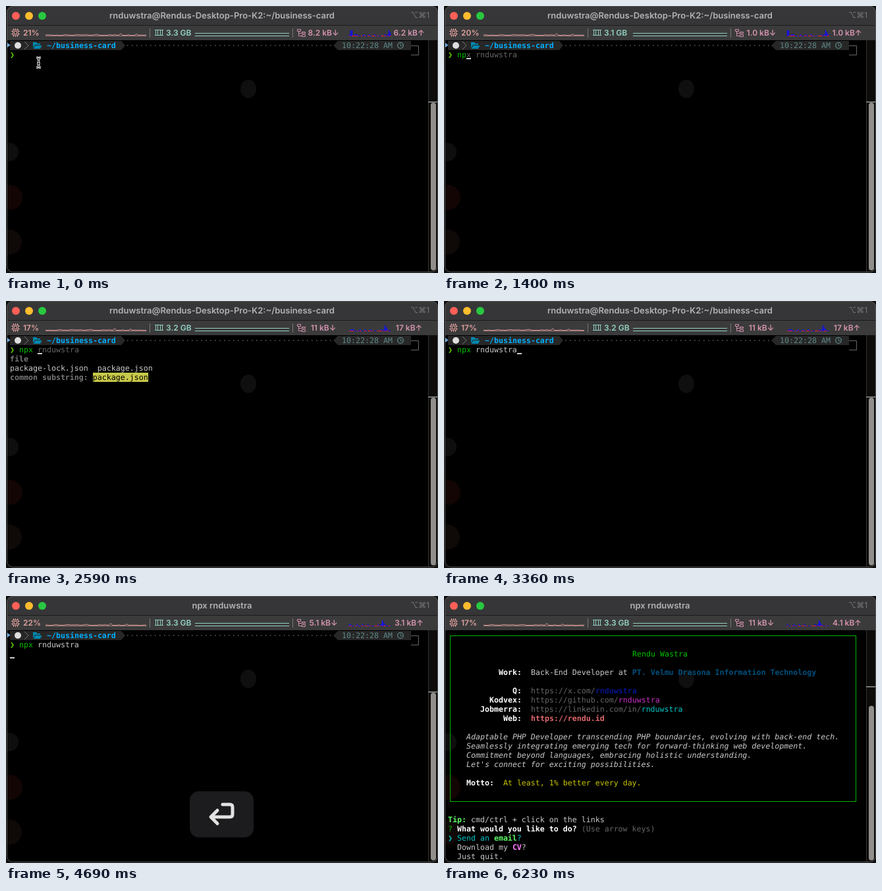
An HTML page that plays this animation: 656x406 px, repeating every 6300 ms.

```html
<!DOCTYPE html>
<html lang="en">
<head>
<meta charset="utf-8">
<title>Terminal business card</title>
<style>
html, body { margin: 0; width: 100%; height: 100%; overflow: hidden; background: #000; }
svg { display: block; width: 656px; height: 406px; }
text { white-space: pre; text-rendering: geometricPrecision; }
.term text { font: 11.627px "DejaVu Sans Mono", monospace; fill: #c9c9c9; }
.ui text { font: 600 12px Inter, sans-serif; }
.ui .title { font-size: 13px; fill: #b3b3b4; text-anchor: middle; }
.term .b { font-weight: bold; }
.term .i { font-style: italic; }
.term .white { fill: #fff; }
.term .dim { fill: #666; }
.term .head { fill: #777; }
.term .green { fill: #00c200; }
.term .lime { fill: #5ffa68; }
.term .cyan { fill: #00c5c7; }
.term .yellow { fill: #c7c400; }
.term .blue { fill: #0a1cc4; }
.term .navy { fill: #004f7c; }
.term .pink { fill: #ca30c7; }
.term .violet { fill: #ff77ff; }
.term .red { fill: #e0686c; }
.term .path { fill: #00afff; }
.term .time { fill: #5f8787; }
.term .prompt { fill: #5fd700; }
.term .black { fill: #000; }
</style>
</head>
<body>
<svg viewBox="0 0 656 406" fill="none">
  <defs><clipPath id="win"><rect x="1" y="0" width="655" height="405" rx="9"/></clipPath></defs>
  <rect width="656" height="406" fill="#101010"/>
  <g clip-path="url(#win)">
    <rect width="656" height="406" fill="#000"/>
    <ellipse cx="368" cy="126" rx="12" ry="14" fill="#0f0f0f"/>
    <circle cx="5" cy="222" r="14" fill="#0e0e0e"/>
    <circle cx="6" cy="291" r="19" fill="#120504"/>
    <circle cx="5" cy="359" r="19" fill="#0f0908"/>
    <rect width="656" height="29" fill="#363638"/>
    <rect y="30" width="656" height="22" fill="#3b3b3c"/>
    <path d="M0 29.5H656" stroke="#1c1c1c"/>
    <path d="M641.5 52V406" stroke="#333"/>
    <rect x="642" y="52" width="14" height="354" fill="#0d0c0b"/>
    <path id="mark" d="M641 0H656" stroke="#777" stroke-width="2"/>
    <rect id="thumb" x="645" width="8" rx="4" fill="#918f8c"/>
  </g>
  <rect x="1.5" y=".5" width="654" height="404" rx="9" stroke="#555"/>
  <g class="ui">
    <circle cx="15" cy="15" r="6" fill="#ff5f57"/>
    <circle cx="35" cy="15" r="6" fill="#febc2e"/>
    <circle cx="55" cy="15" r="6" fill="#28c840"/>
    <text id="title" class="title" x="328" y="19"></text>
    <text x="614" y="18" fill="#77777a" style="font:12px Inter,'DejaVu Sans',sans-serif">⌥⌘1</text>
    <path d="M218.5 34V48M435.5 34V48" stroke="#777"/>
    <g stroke="#d89a97">
      <rect x="10.5" y="36.500" width="8" height="8"/>
      <rect x="12.500" y="38.500" width="4" height="4"/>
      <path d="M11.500 34V36M14.500 34V36M17.500 34V36M11.500 45V47M14.500 45V47M17.500 45V47M8 38.500H10M8 42.500H10M19 38.500H21M19 42.500H21"/>
      <path d="M60 45.500H213" opacity=".7"/>
      <path id="cpuLine"/>
    </g>
    <g stroke="#8fcdbd">
      <path d="M226 36.500H239M226 44.500H239M227.500 36V45M230.500 36V45M234.500 36V45M237.500 36V45M287 41.500H430M287 45.500H430"/>
    </g>
    <path d="M442.500 35.500H447.500V38.500H442.500ZM449.500 43.500H454.500V46.500H449.500ZM444.500 39V45.500H449M445 41.500H449M449.500 39.500H454.500V41.500H449.500Z" stroke="#cf8fa9"/>
    <path id="netLine" stroke="#0c0cff" stroke-width="1.500"/>
    <path id="netDots" stroke="#e02030"/>
    <text id="cpu" x="26" y="45" fill="#e0a19e"></text>
    <text id="mem" x="243" y="45" fill="#93d2c2"></text>
    <g fill="#d594ae" text-anchor="middle">
      <text id="down" x="482" y="45"></text>
      <text id="up" x="612" y="45"></text>
    </g>
  </g>
  <g id="shell" class="term">
    <path d="M6 53H175L181 60L175 67H6Z M615 53H504L497 60L504 67H615Z" fill="#272727"/>
    <path d="M2 56L6.500 59.500L2 63Z" fill="#6fa8dc"/>
    <circle cx="18" cy="60" r="5" fill="#dedede"/>
    <path d="M28 54L34 60L28 66" stroke="#777"/>
    <path d="M41 55H46L47.500 57H52V59H44L41 64ZM44.500 60H54.500L52 65H41.500Z" fill="#0087af"/>
    <path d="M184 60H496" stroke="#626262" stroke-width="1.500" stroke-dasharray="1.500 5.500"/>
    <circle cx="599" cy="60" r="4.300" stroke="#5f8787" stroke-width="1.300"/>
    <path d="M599 57.500V60.500H601.500" stroke="#5f8787"/>
    <path d="M615 60.500H626.500V74.500H615" stroke="#666"/>
    <g id="promptText"></g>
    <g id="input"></g>
    <rect id="cursor" width="7" height="2" fill="#d0d0d0"/>
  </g>
  <g id="card" class="term">
    <rect x="9.500" y="60.500" width="616" height="252" stroke="#00b400"/>
    <g id="cardText"></g>
  </g>
  <g id="key">
    <rect x="279" y="297" width="97" height="70" rx="14" fill="#202022"/>
    <path d="M329 317H340Q344 317 344 321V332Q344 336 340 336H312M321 326L311 336L321 346" stroke="#fff" stroke-width="5" stroke-linejoin="round" stroke-linecap="round"/>
  </g>
  <g id="mouse">
    <path id="beam" d="M-3.500 -7.500Q0 -7.500 0 -5V5Q0 7.500 -3.500 7.500M3.500 -7.500Q0 -7.500 0 -5V5Q0 7.500 3.500 7.500M-2 1.500H2" stroke="#fff" stroke-width="3"/>
    <use href="#beam" style="stroke:#000"/>
    <path d="M-3.500 -7.500Q0 -7.500 0 -5V5Q0 7.500 -3.500 7.500M3.500 -7.500Q0 -7.500 0 -5V5Q0 7.500 3.500 7.500M-2 1.500H2" stroke="#000"/>
  </g>
</svg>
<script>
const LOOP = 6300, STEP = 70;
const USER = 'rnduwstra';
const COMMAND = 'npx ' + USER;
const $ = id => document.getElementById(id);
const show = (id, on) => $(id).setAttribute('visibility', on ? 'visible' : 'hidden');
const set = (id, attrs) => { for (const k in attrs) $(id).setAttribute(k, attrs[k]); };

// One terminal line: column, row, then pairs of class and text.
function line(col, row, ...parts) {
  let spans = '';
  for (let i = 0; i < parts.length; i += 2)
    spans += `<tspan class="${parts[i]}">${parts[i + 1]}</tspan>`;
  return `<text x="${6 + 7 * col}" y="${64 + 14 * row}">${spans}</text>`;
}

$('promptText').innerHTML =
  line(8, 0, 'path b', '~/business-card') +
  line(72, 0, 'time', '10:22:28 AM') +
  line(0, 1, 'prompt b', '❯');

$('cardText').innerHTML = [
  line(40, 2, 'green', 'Rendu Wastra'),
  line(11, 4, 'white b', 'Work:', '', '  Back-End Developer at ', 'navy b', 'PT. Velmu Drasona Information Technology'),
  line(14, 6, 'white b', 'Q:', 'dim', '  https://x.com/', 'blue', USER),
  line(9, 7, 'white b', 'Kodvex:', 'dim', '  https://github.com/', 'pink', USER),
  line(7, 8, 'white b', 'Jobmerra:', 'dim', '  https://linkedin.com/in/', 'cyan', USER),
  line(12, 9, 'white b', 'Web:', 'red b', '  https://rendu.id'),
  ...['Adaptable PHP Developer transcending PHP boundaries, evolving with back-end tech.',
    'Seamlessly integrating emerging tech for forward-thinking web development.',
    'Commitment beyond languages, embracing holistic understanding.',
    "Let's connect for exciting possibilities."].map((s, i) => line(4, 11 + i, 'i', s)),
  line(4, 16, 'white b', 'Motto:', 'yellow', '  At least, 1% better every day.'),
  line(0, 20, 'lime b', 'Tip:', '', ' cmd/ctrl + click on the links'),
  line(0, 21, 'green', '? ', 'white b', 'What would you like to do?', 'dim', ' (Use arrow keys)'),
  line(0, 22, 'cyan', '❯ Send an ', 'lime b', 'email', 'cyan', '?'),
  line(2, 23, '', 'Download my ', 'violet b', 'CV', '', '?'),
  line(2, 24, '', 'Just quit.')
].join('');

// Status bar readings, refreshed once a second.
const cpu = [21, 20, 14, 17, 19, 22, 17];
const mem = ['3.3', '3.1', '3.1', '3.2', '3.3', '3.3', '3.3'];
const down = ['8.2', '1.0', '5.1', '11', '0.0', '5.1', '11'];
const up = ['6.2', '1.0', '0.0', '17', '0.0', '3.1', '4.1'];
const keyTimes = [1120, 1400, 1680, 2170];
const ACCEPT = 3150, ENTER = 3920, CARD = 4760;

const noise = n => { const s = Math.sin(n * 12.9898) * 43758.5453; return s - Math.floor(s); };

function drawStatus(k) {
  $('cpu').textContent = cpu[k] + '%';
  $('mem').textContent = mem[k] + ' GB';
  $('down').textContent = down[k] + ' kB↓';
  $('up').textContent = up[k] + ' kB↑';
  let load = '', bars = '', dots = '';
  for (let x = 60; x <= 213; x += 3) {
    const n = x / 3 + k, peak = n === 58 ? 2.5 : n === 46 || n === 66 ? 1.3 : 0;
    load += (load ? 'L' : 'M') + x + ' ' + (44.7 - noise(n) * 1.2 - peak).toFixed(1);
  }
  for (let x = 521; x < 584; x += 2) {
    const n = (x - 521) / 2 + k, r = noise(n + 90);
    const h = n === 1 || n === 2 || n === 30 ? 9 : n === 31 ? 6 : r > .75 ? 3 : 1;
    bars += `M${x + .5} 46V${46 - h}`;
    if (r > .45) dots += `M${x} 45.500h2`;
  }
  set('cpuLine', { d: load });
  set('netLine', { d: bars });
  set('netDots', { d: dots });
}

function inputLines(t, typed) {
  if (t >= ACCEPT) return line(2, 1, 'green', 'npx', '', ' ' + USER);
  if (!typed) return '';
  let out = line(2, 1, 'green', COMMAND.slice(0, typed), 'dim', COMMAND.slice(typed));
  if (t >= 2520)
    out += line(0, 2, 'head b', 'file') +
      line(0, 3, '', 'package-lock.json  package.json') +
      '<rect x="132" y="109" width="84" height="14" fill="#c9c94a"/>' +
      line(0, 4, 'head b', 'common substring: ', 'black', 'package.json');
  else if (t >= 1890)
    out += line(0, 2, 'head b', 'external command') + line(0, 3, '', 'npx');
  return out;
}

function draw(t) {
  const carded = t >= CARD, entered = t >= ENTER;
  const typed = t >= ACCEPT ? COMMAND.length : keyTimes.filter(k => t >= k).length;
  $('title').textContent = entered ? COMMAND : USER + '@Rendus-Desktop-Pro-K2:~/business-card';
  drawStatus(Math.floor((t + 420) / 1000));

  $('shell').style.display = carded ? 'none' : '';
  $('card').style.display = carded ? '' : 'none';
  $('input').innerHTML = inputLines(t, typed);
  set('cursor', { x: entered ? 6 : 20 + 7 * typed, y: entered ? 93 : 79 });
  show('cursor', t >= 490);

  const top = carded ? 167 : 147;
  set('thumb', { y: top, height: 402 - top });
  set('mark', { transform: `translate(0 ${carded ? 138 : 146})` });

  const fade = Math.min(1, Math.max(0, (5400 - t) / 800));
  set('key', { opacity: entered ? fade : 0 });

  const p = Math.min(1, t / 700), ease = p * p * (3 - 2 * p);
  set('mouse', { transform: `translate(${49.5 + ease} ${86 + 4 * ease})` });
  show('mouse', t < keyTimes[0]);
}

let last = -1;
function tick() {
  const t = Math.floor(performance.now() % LOOP / STEP) * STEP;
  if (t !== last) draw(last = t);
  requestAnimationFrame(tick);
}
tick();
</script>
</body>
</html>
```
